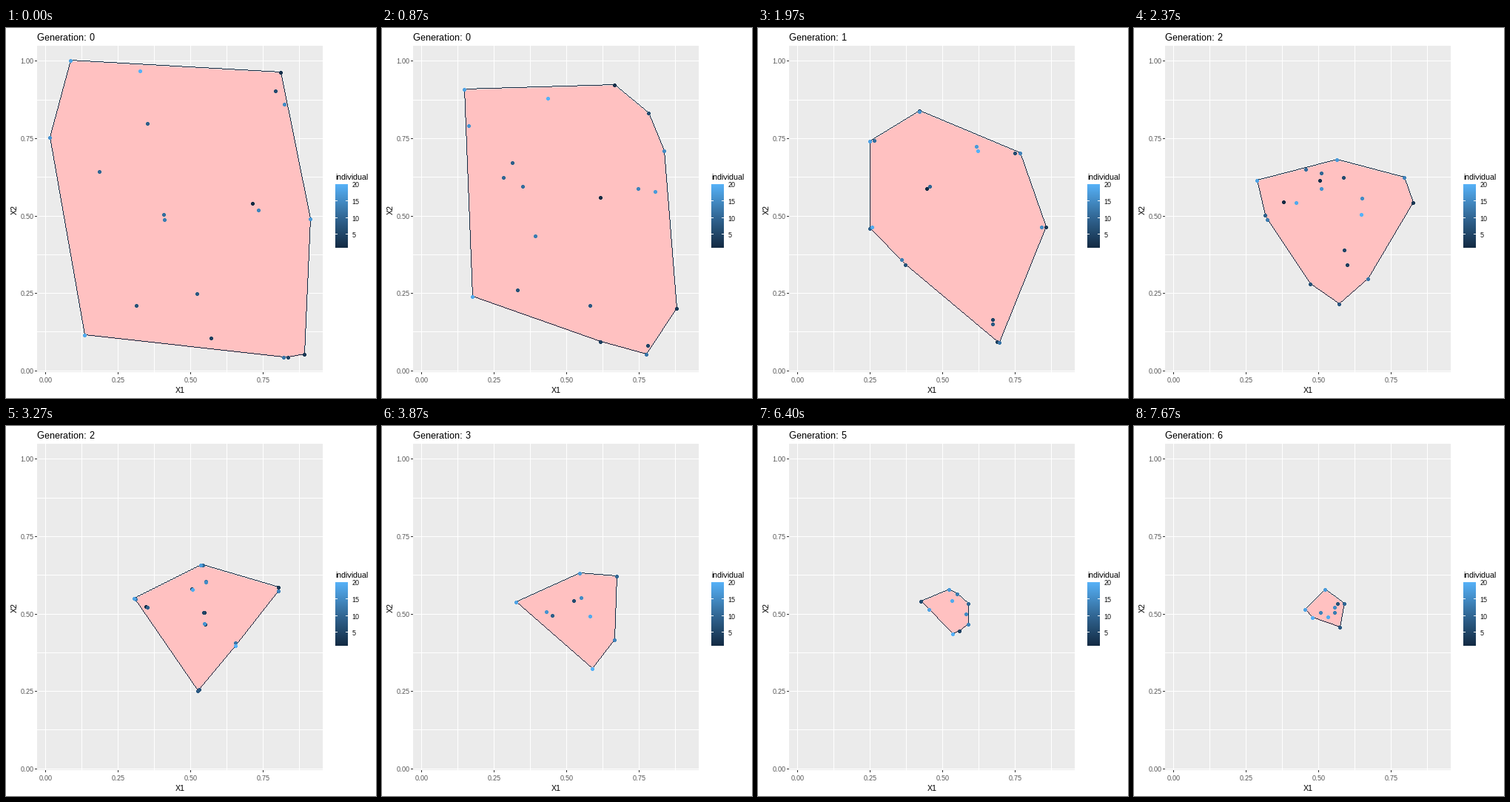
Write a matplotlib script that moves like this. It is 500 by 500 pixels and loops after 8000 ms.

```python
import numpy as np
import matplotlib.pyplot as plt
from matplotlib.animation import FuncAnimation
from matplotlib.colors import LinearSegmentedColormap
from matplotlib.patches import Polygon, Rectangle

SIZE, DPI = 500, 100
LOOP, INTERVAL = 8000, 20
STEPS = 19
STARTS = [670, 1970, 3270, 4530, 5800, 7070]
PX = 72 / DPI

# Whole-pixel glyph advances, as on a low-resolution screen device
plt.rcParams.update({"font.family": "Liberation Sans",
                     "text.hinting": "native", "text.hinting_factor": 1})
BLUES = LinearSegmentedColormap.from_list("blues", ["#132B43", "#336A98", "#56B1F7"])

# Individuals a..t in stage pixels
POPULATION = np.array([
    (333, 237), (371, 60), (403, 441), (277, 419), (381, 445),
    (364, 85), (176, 375), (258, 359), (191, 129), (126, 194),
    (213, 252), (375, 445), (214, 259), (341, 246), (376, 103),
    (59, 148), (411, 258), (87, 44), (106, 415), (181, 58)]) + 0.3

# Each couple is replaced by two children at its midpoint
COUPLES = [
    "rk tq bp fn oc is ja mg he dl",
    "qj nc ko fs rm ai eb dp tl gh",
    "ra mp id fe qk ob sl jc ng th",
    "af ik qb mc rl so np eg jh td",
    "af pt nh iq ed bj rl ks mc og",
    "iq rl bj at fn he md cg sp ko",
]


def breed(points, couples):
    children = points.copy()
    for couple in couples.split():
        pair = [ord(letter) - ord("a") for letter in couple]
        children[pair] = points[pair].mean(axis=0)
    return children


generations = [POPULATION]
for couples in COUPLES:
    generations.append(breed(generations[-1], couples))


def convex_hull(points):
    def chain(ordered):
        path = []
        for x, y in ordered:
            while len(path) > 1:
                (x0, y0), (x1, y1) = path[-2], path[-1]
                if (x1 - x0) * (y - y0) - (y1 - y0) * (x - x0) > 1e-6:
                    break
                path.pop()
            path.append((x, y))
        return path[:-1]

    ordered = sorted(map(tuple, points))
    return np.array(chain(ordered) + chain(ordered[::-1]))


def outline_pixels(corners):
    """Pixels of a one-pixel line without smoothing around the corners."""
    edges = zip(corners, np.roll(corners, -1, axis=0))
    return np.rint(np.concatenate(
        [np.linspace(a, b, int(abs(b - a).max()) + 1) for a, b in edges]))


fig = plt.figure(figsize=(SIZE / DPI, SIZE / DPI), dpi=DPI, facecolor="white")
ax = fig.add_axes([0, 0, 1, 1])
ax.axis("off")

LEFT, RIGHT, TOP, BOTTOM = 42, 428, 24, 465


def box(x0, y0, x1, y1, color):
    """Fill whole pixels from x0, y0 up to but not including x1, y1."""
    ax.add_patch(Rectangle((x0 - 0.5, y0 - 0.5), x1 - x0, y1 - y0,
                           facecolor=color, linewidth=0, zorder=1))


def label(x, y, text, size, color="black", **kwargs):
    return ax.text(x, y, text, fontsize=size * PX, color=color, **kwargs)


box(LEFT, TOP, RIGHT, BOTTOM, "#EBEBEB")
for x in (53, 102, 151, 200, 249, 298, 347, 396):
    box(x, TOP, x + 1, BOTTOM, "white")
for i in range(9):
    y = int(463.25 - 52.3 * i)
    box(LEFT, y, RIGHT, y + 1, "white")
    if i % 2 == 0:
        box(LEFT - 3, y, LEFT, y + 1, "#333333")
        label(37, y + 3.5, f"{i / 8:.2f}", 9, "#4D4D4D", ha="right")
for i, x in enumerate((53, 151, 249, 347)):
    box(x, BOTTOM, x + 1, BOTTOM + 3, "#333333")
    label(x, 478.5, f"{i / 4:.2f}", 9, "#4D4D4D", ha="center")

label(234.5, 492.5, "X1", 11, ha="center")
label(11, 244.5, "X2", 11, rotation=90, ha="center", va="center")
title = label(41.5, 16.5, "", 13)

# Colour bar
label(444.5, 204.5, "individual", 11)
ax.imshow(np.linspace(1, 0, 86)[:, None], cmap=BLUES, aspect="auto",
          extent=(444.5, 461.5, 296.5, 210.5), zorder=1)
for value in (5, 10, 15, 20):
    y = int(210.7 + (20 - value) * 86.4 / 19)
    box(445, y, 448, y + 1, "white")
    box(459, y, 462, y + 1, "white")
    label(467, y + 4.5, str(value), 9)

ax.set_xlim(-0.5, SIZE - 0.5)
ax.set_ylim(SIZE - 0.5, -0.5)

hull = Polygon(POPULATION, closed=True, facecolor="#FFC1C1", linewidth=0, zorder=2)
ax.add_patch(hull)
outline, = ax.plot([], [], ",", color="#132B43", zorder=2.5)
dots = ax.scatter(*POPULATION.T, s=(3.8 * PX) ** 2, c=np.arange(20), cmap=BLUES,
                  linewidths=0, antialiased=False, zorder=3)


def state(ms):
    """Return the last finished generation and the progress to the next."""
    for index in reversed(range(len(STARTS))):
        if ms >= STARTS[index]:
            step = min((ms - STARTS[index]) * 3 // 100 + 1, STEPS)
            return index, step / STEPS
    return 0, 0.0


def update(frame):
    index, progress = state(frame * INTERVAL + INTERVAL // 2)
    points = np.rint((1 - progress) * generations[index]
                     + progress * generations[index + 1])
    corners = convex_hull(points)
    dots.set_offsets(points)
    hull.set_xy(corners)
    # Pixel markers snap downwards, so keep them off the rounding edge
    outline.set_data(*(outline_pixels(corners) - 0.25).T)
    title.set_text(f"Generation: {index + (progress >= 0.5)}")
    return hull, outline, dots, title


anim = FuncAnimation(fig, update, frames=LOOP // INTERVAL, interval=INTERVAL,
                     repeat=True, repeat_delay=0)
plt.show()
```
